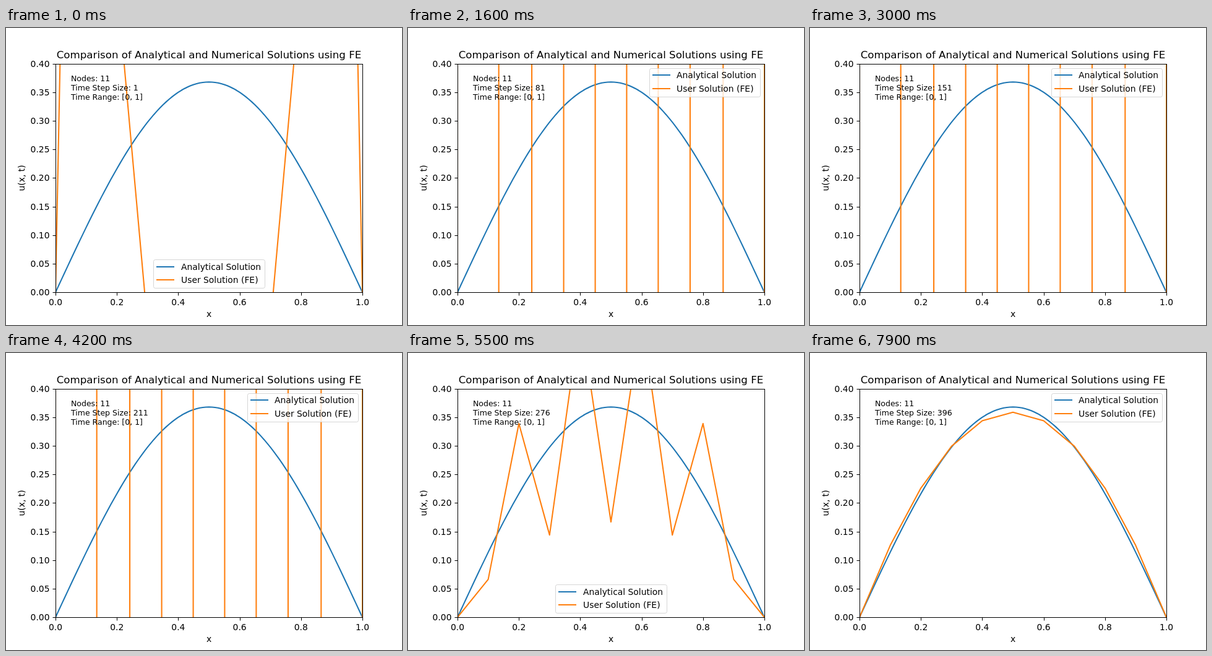
These frames come from a looping animation (640x480 px, 8 s). An HTML page with a canvas:

```html
<!DOCTYPE html>
<html lang="en">
<head>
<meta charset="utf-8">
<title>Forward Euler heat equation</title>
<style>
html, body { margin: 0; width: 100%; height: 100%; overflow: hidden; background: #fff; }
canvas { display: block; }
</style>
</head>
<body>
<canvas id="stage" width="640" height="480"></canvas>
<script>
const ctx = document.getElementById('stage').getContext('2d');
const BLUE = '#1f77b4', ORANGE = '#ff7f0e';
const STEP_MS = 100, STEPS = 80;
const CELLS = 10, FORCE = 3.1;
const LINE = 2.083;

const px = x => 80 + 496 * x;
const py = u => 427.2 - 924 * u;
const snap = v => Math.floor(v + 0.5);

// Legend places in order of preference: box and the two row centres.
const places = [
  { x: 390, y: 65, w: 179, h: 46, rows: [76, 98] },
  { x: 238, y: 374, w: 180, h: 46, rows: [386, 407] },
  { x: 238, y: 219, w: 180, h: 46, rows: [231, 252] }
];

// Forward Euler on linear elements, one sine mode at a time, up to t = 1.
function solve(n) {
  const u = new Array(CELLS + 1).fill(0);
  for (let k = 1; k < CELLS; k += 2) {
    const a = k * Math.PI / CELLS, c = Math.cos(a);
    const rate = 300 * (1 - c) / (2 + c);
    const push = FORCE * 0.2 / Math.tan(a / 2) * 3 / (2 + c);
    let v = k === 1 ? 1 : 0;
    for (let i = 0; i < n; i++) v += (push * Math.exp(-i / n) - rate * v) / n;
    for (let j = 1; j < CELLS; j++) u[j] += v * Math.sin(a * j);
  }
  return u.map((v, j) => [px(j / CELLS), py(v)]);
}

// Part of a segment between two heights, or null.
function cut([x0, y0], [x1, y1], lo, hi) {
  if (Math.max(y0, y1) < lo || Math.min(y0, y1) > hi) return null;
  const end = (x, y) => {
    const lim = Math.min(hi, Math.max(lo, y));
    return lim === y ? [x, y] : [x0 + (x1 - x0) * (lim - y0) / (y1 - y0), lim];
  };
  return [end(x0, y0), end(x1, y1)];
}

function overlap(points, b) {
  let count = 0, crosses = false;
  points.forEach((p, i) => {
    if (p[0] > b.x && p[0] < b.x + b.w && p[1] > b.y && p[1] < b.y + b.h) count++;
    const s = i && cut(points[i - 1], p, b.y, b.y + b.h);
    if (s && Math.max(s[0][0], s[1][0]) > b.x && Math.min(s[0][0], s[1][0]) < b.x + b.w) crosses = true;
  });
  return count + (crosses ? 1 : 0);
}

function bestPlace(points) {
  const cost = places.map(b => overlap(points, b));
  return places[cost.indexOf(Math.min(...cost))];
}

function text(str, x, y, size = 13.89, align = 'left') {
  ctx.font = size + 'px "DejaVu Sans", sans-serif';
  ctx.textAlign = align;
  ctx.fillStyle = '#000';
  ctx.fillText(str, x, y);
}

function curve(points, color) {
  ctx.strokeStyle = color;
  ctx.lineWidth = LINE;
  ctx.lineJoin = 'round';
  ctx.lineCap = 'square';
  ctx.beginPath();
  let last = null;
  for (let i = 1; i < points.length; i++) {
    const s = cut(points[i - 1], points[i], -400, 900);
    if (!s) { last = null; continue; }
    if (!last || last[0] !== s[0][0] || last[1] !== s[0][1]) ctx.moveTo(...s[0]);
    ctx.lineTo(...s[1]);
    last = s[1];
  }
  ctx.stroke();
}

function axes() {
  ctx.fillStyle = '#000';
  ctx.fillRect(80, 58, 1, 370);
  ctx.fillRect(576, 58, 1, 370);
  ctx.fillRect(80, 58, 497, 1);
  ctx.fillRect(80, 427, 497, 1);
  for (let i = 0; i <= 5; i++) {
    const x = px(i / 5);
    ctx.fillStyle = '#000';
    ctx.fillRect(snap(x), 428, 1, 4.5);
    text((i / 5).toFixed(1), x, 448, 13.89, 'center');
  }
  for (let i = 0; i <= 8; i++) {
    const y = snap(py(i / 20));
    ctx.fillStyle = '#000';
    ctx.fillRect(75.5, y, 4.5, 1);
    text((i / 20).toFixed(2), 70.5, y + 5, 13.89, 'right');
  }
  text('Comparison of Analytical and Numerical Solutions using FE', 328, 49, 16.67, 'center');
  text('x', 328, 467, 13.89, 'center');
  ctx.save();
  ctx.translate(30, 242.4);
  ctx.rotate(-Math.PI / 2);
  text('u(x, t)', 0, 0, 13.89, 'center');
  ctx.restore();
}

function legend(b) {
  ctx.beginPath();
  ctx.roundRect(b.x + 0.5, b.y + 0.5, b.w, b.h, 2.8);
  ctx.fillStyle = 'rgba(255,255,255,0.8)';
  ctx.fill();
  ctx.strokeStyle = 'rgba(204,204,204,0.8)';
  ctx.lineWidth = 1;
  ctx.stroke();
  [['Analytical Solution', BLUE], ['User Solution (FE)', ORANGE]].forEach(([name, color], i) => {
    const y = b.rows[i];
    ctx.fillStyle = color;
    ctx.fillRect(b.x + 5, y - 1, 29, 2);
    text(name, b.x + (b.x > 300 ? 44 : 45), y + 5);
  });
}

const exact = Array.from({ length: 101 }, (_, i) =>
  [px(i / 100), py(Math.exp(-1) * Math.sin(Math.PI * i / 100))]);

function draw(step) {
  const n = 1 + 5 * step, points = solve(n);
  ctx.fillStyle = '#fff';
  ctx.fillRect(0, 0, 640, 480);
  ctx.save();
  ctx.beginPath();
  ctx.rect(80, 58, 496, 369);
  ctx.clip();
  curve(exact, BLUE);
  curve(points, ORANGE);
  ctx.restore();
  axes();
  ['Nodes: 11', 'Time Step Size: ' + n, 'Time Range: [0, 1]']
    .forEach((s, i) => text(s, 105, 86 + 15 * i, 12.5));
  legend(bestPlace(points));
}

const start = performance.now();
let shown = -1;
function tick() {
  const step = Math.floor((performance.now() - start) / STEP_MS) % STEPS;
  if (step !== shown) draw(shown = step);
  requestAnimationFrame(tick);
}
tick();
</script>
</body>
</html>
```
